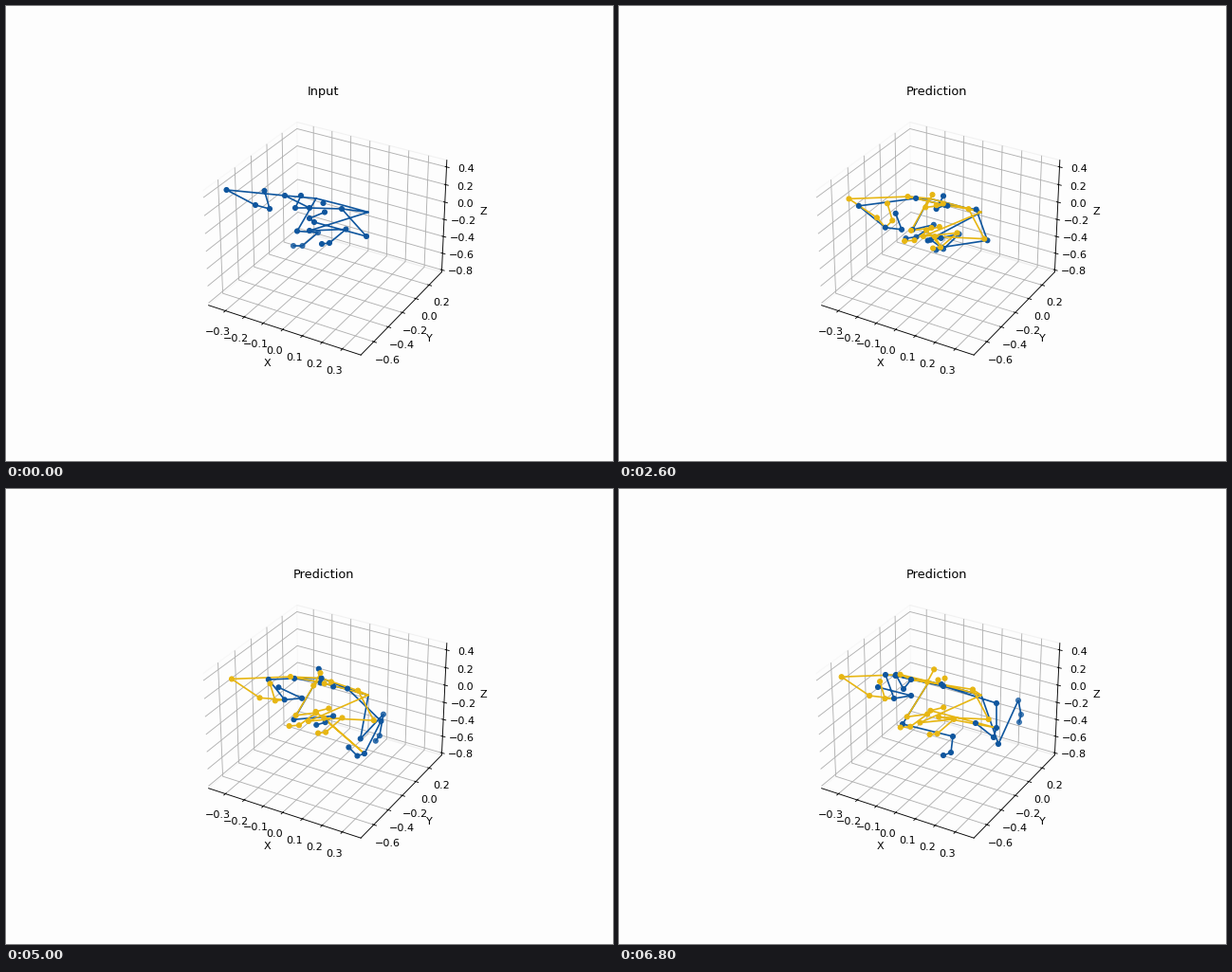
Animation, 640 px wide and 480 px high, one loop 7 s. Source, as a matplotlib script:

```python
import numpy as np
import matplotlib.pyplot as plt
from matplotlib.animation import FuncAnimation
from matplotlib.colors import to_rgba

W, H = 640, 480
FRAMES, INPUT_FRAMES = 35, 10
LAST = FRAMES - 1
PAPER, BLUE, GOLD = "#fdfdfd", "#0f569e", "#e7b613"

# Bones as chains of joint ids
CHAINS = [
    (5, 4, 3, 2, 1, 0, 6, 7, 8, 9, 10),
    (1, 25, 26, 27, 28, 29, 30),
    (6, 17, 18, 19, 20, 21, 22),
    (25, 24, 17),
    (24, 14, 15),
]
FIXED = {0: (354.5, 210), 1: (327, 203), 6: (382, 217.5)}
TWINS = {20: 19, 24: 13, 28: 27}
RIGHT_FOOT, LEFT_FOOT = (3, 4, 5), (8, 9, 10)


class Limb:
    """Joints that sweep from start to end, bowed so as to pass through mid."""

    def __init__(self, ids, start, mid, end, lag, drift):
        self.ids = ids
        self.start, mid, self.end = (np.reshape(p, (-1, 2)).astype(float)
                                     for p in (start, mid, end))
        self.bow = mid - (self.start + self.end) / 2
        # The late swing builds up along the limb
        reach = np.minimum(np.arange(len(ids)) / 2, 1)
        self.lag = np.outer(reach, lag)
        self.drift = np.array(drift)

    def truth(self, n):
        u = n / LAST
        s = u * u * (3 - 2 * u)
        late = max(0, 2 * u - 1)
        return (self.start + (self.end - self.start) * s
                + self.bow * np.sin(np.pi * s)
                + self.lag * np.sin(np.pi * late))

    def guess(self, n):
        """The last input pose, drifting steadily as a whole."""
        progress = (n - INPUT_FRAMES) / (LAST - INPUT_FRAMES)
        return self.truth(INPUT_FRAMES - 1) + self.drift * progress


spine = Limb(
    (12, 13, 14, 15),
    start=[334.5, 208, 320, 213, 305, 213, 311, 200],
    mid=[349, 211, 346, 208, 339, 214, 345, 200],
    end=[340, 206, 308, 201, 300, 211, 292, 196],
    lag=(12, -8), drift=(2, -10))

left_arm = Limb(
    (17, 18, 19, 21, 22),
    start=[354, 214, 380, 243, 325, 228, 320, 224, 336, 217.5],
    mid=[379, 214, 392, 246, 351, 262, 339, 255, 345, 253],
    end=[342, 208, 398, 226, 398, 252, 395, 262, 376, 247],
    lag=(-2, 20), drift=(5, -3))

right_arm = Limb(
    (25, 26, 27, 29, 30),
    start=[294, 200, 232.5, 194, 263, 210, 278, 214, 272.5, 195],
    mid=[316, 203, 262, 214, 287, 239, 305, 240, 295, 224.5],
    end=[291.5, 197, 281, 196, 290, 221, 308, 218, 273, 209],
    lag=(3, -9), drift=(-9, -6))

right_leg = Limb(
    (2, 3, 4, 5),
    start=[307, 237.5, 329, 239, 312.5, 253, 303, 253],
    mid=[309, 237, 335, 232, 318, 245, 307, 247],
    end=[299, 248, 352, 261, 350, 278, 342, 281],
    lag=(0, -17), drift=(-5, 4))

left_leg = Limb(
    (7, 8, 9, 10),
    start=[320, 237, 358.5, 235.5, 341, 250, 333, 251],
    mid=[336, 253, 366, 240, 352, 256, 345, 258],
    end=[400, 269, 421, 223, 424, 238, 422, 246],
    lag=(0, 14), drift=(-4, 4))

LIMBS = (spine, left_arm, right_arm, right_leg, left_leg)


def bone_path(joints):
    gap = (np.nan, np.nan)
    return np.array([p for chain in CHAINS
                     for p in [*(joints[j] for j in chain), gap]]).T


class Skeleton:
    def __init__(self, ax, color, z):
        self.color = color
        self.bones, = ax.plot([], [], color=color, lw=1.5, zorder=2 + z)
        self.dots = ax.scatter([], [], s=20, color=color, zorder=4 + z)

    def show(self, pose, twins, fade):
        self.bones.set_data(*bone_path({**FIXED, **pose, **twins}))
        self.dots.set_offsets(np.array(list(pose.values())))
        shades = [to_rgba(self.color, fade(j)) for j in pose]
        self.dots.set_facecolor(shades)
        self.dots.set_edgecolor(shades)

    def set_visible(self, on):
        self.bones.set_visible(on)
        self.dots.set_visible(on)


fig = plt.figure(figsize=(8, 6), dpi=80, facecolor=PAPER)

size = 285.8
box = fig.add_axes([192 / W, 1 - 386.2 / H, size / W, size / H],
                   projection="3d", facecolor=PAPER)
box.set(xlim=(-0.3906, 0.3906), ylim=(-0.7734, 0.3984), zlim=(-0.826, 0.476))
box.set_xlabel("X", labelpad=2)
box.set_ylabel("Y", labelpad=2)
box.set_zlabel("Z", labelpad=2)
box.set_xticks(np.arange(-3, 4) / 10)
box.set_yticks(np.arange(-3, 2) / 5)
box.set_zticks(np.arange(-4, 3) / 5)
for axis in (box.xaxis, box.yaxis, box.zaxis):
    axis.pane.fill = False
title = box.set_title("Input", fontsize=11.6)

# Flat layer in pixel coordinates
stage = fig.add_axes([0, 0, 1, 1], zorder=5)
stage.set(xlim=(0, W), ylim=(H, 0))
stage.axis("off")
actual = Skeleton(stage, BLUE, 0)
predicted = Skeleton(stage, GOLD, 1)


def update(n):
    truth, guess = {}, {}
    for limb in LIMBS:
        truth.update(zip(limb.ids, limb.truth(n)))
        guess.update(zip(limb.ids, limb.guess(n)))
    twins = {twin: truth[j] for twin, j in TWINS.items()}

    def fade(j):
        # The right foot comes nearer while the left one recedes
        if j in RIGHT_FOOT:
            return 0.75 + 0.25 * n / LAST
        if j in LEFT_FOOT:
            return 1 - 0.3 * n / LAST
        return 1

    predicting = n >= INPUT_FRAMES
    title.set_text("Prediction" if predicting else "Input")
    actual.show(truth, twins, fade)
    predicted.set_visible(predicting)
    if predicting:
        predicted.show(guess, twins, lambda j: 1)
    return title, actual.bones, actual.dots, predicted.bones, predicted.dots


anim = FuncAnimation(fig, update, frames=FRAMES, interval=200, repeat=True)
plt.show()
```
